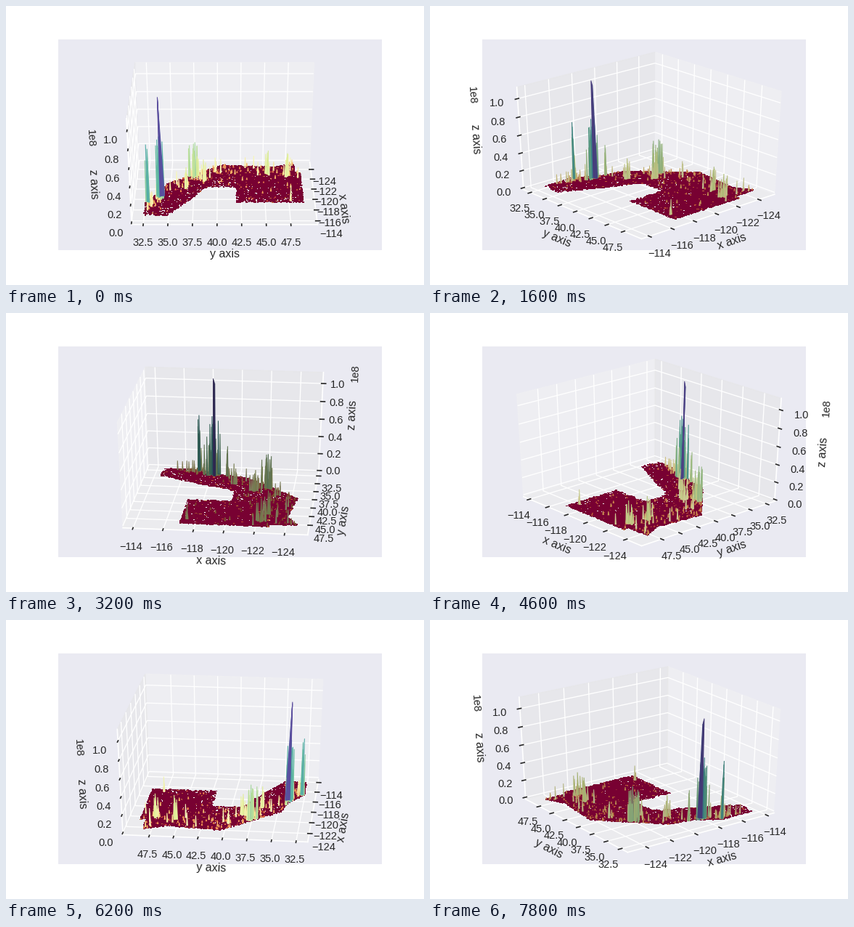
These frames come from a looping animation (576x384 px, 8 s). A matplotlib script:

```python
import numpy as np
import matplotlib.pyplot as plt
from matplotlib.animation import FuncAnimation
from mpl_toolkits.mplot3d.art3d import Poly3DCollection

INK = "0.15"
plt.rcParams.update({
    "font.family": "Liberation Sans",
    "axes.facecolor": "#EAEAF2", "axes.edgecolor": "white",
    "axes.linewidth": 1.25, "axes.labelsize": 12, "axes.labelcolor": INK,
    "text.color": INK, "grid.color": "white", "grid.linewidth": 1,
    "xtick.color": INK, "ytick.color": INK,
    "xtick.labelsize": 11, "ytick.labelsize": 11,
    "xtick.major.width": 1.25, "ytick.major.width": 1.25,
})
FRAMES, INTERVAL, STEP = 40, 200, 6
TOP = 1.1e8
X_LIM, Y_LIM = (-125.27, -113.58), (31.7, 49.83)
rng = np.random.default_rng(7)

# Key points (latitude, longitude) of the coast and the inland border
COAST = [(32.5, -117.1), (34.1, -118.9), (34.6, -120.6), (37.5, -122.5),
         (40.4, -124.4), (46.2, -124), (48.3, -124.7), (48.45, -122.9)]
INLAND = [(32.5, -114.6), (34.9, -114.5), (39, -120), (41.99, -120), (42, -117)]
# Latitude, longitude, relative height and spread of the big clusters
CITIES = [(34.0, -118.1, .62, .3), (32.75, -117.1, .59, .08),
          (34.2, -119.2, .32, .06), (37.6, -122.2, .36, .3),
          (38.5, -121.4, .22, .2), (36.7, -119.8, .22, .1),
          (45.45, -122.65, .25, .12), (47.5, -122.3, .24, .2),
          (47.66, -117.4, .16, .05)]


def coast(lat):
    return np.interp(lat, *np.transpose(COAST))


def inland(lat):
    return np.interp(lat, *np.transpose(INLAND))


def tint(level, shade=1):
    rgba = plt.get_cmap("Spectral")(np.clip(level, 0, 1) ** .35)
    return rgba * np.array([shade, shade, shade, 1])


def ground():
    """Small flat cells, thinning out away from the coast."""
    lat, lon = np.meshgrid(np.arange(32.55, 49, .1), np.arange(-124.75, -114, .1))
    lat, lon = lat.ravel(), lon.ravel()
    west, east = coast(lat), inland(lat)
    depth = (lon - west) / (east - west)
    density = .88 - .3 * depth - .12 * (lat < 42)
    density += .14 * np.sin(3.1 * lat + 1.7 * lon) * np.sin(2.3 * lon - lat)
    keep = (depth > 0) & (depth < 1) & (rng.random(lat.size) < density)
    n = keep.sum()
    x = lon[keep] + rng.uniform(-.03, .03, n)
    y = lat[keep] + rng.uniform(-.03, .03, n)
    w, d = rng.uniform(.035, .068, (2, n))
    z = rng.random(n) * .008 * TOP
    quads = np.stack([np.stack([x + a * d, y + b * w, z], -1)
                      for a, b in ((-1, -1), (1, -1), (1, 1), (-1, 1))], 1)
    level = np.where(rng.random(n) < .03, rng.uniform(.002, .02, n), 0)
    return quads, tint(level, .76)


def peaks():
    """Rows of latitude, longitude, height and lean of the base."""
    rows = [(34.03, -118.2 - .025 * k, 1 - .012 * k, .09 * k) for k in range(5)]
    for lat, lon, top, spread in CITIES:
        rows.append((lat, lon, top, 0))
        for _ in range(int(230 * top * spread) + 4):
            dy, dx = rng.normal(0, spread, 2)
            rows.append((lat + dy, lon + dx, top * rng.uniform(.2, .95) ** 1.3, 0))
    # Lesser towns along the valleys, then scattered low bumps
    for _ in range(90):
        lat = 32.8 + 16 * rng.random() ** 1.6
        lon = coast(lat) + rng.uniform(.3, 2)
        rows.append((lat, lon, .02 + .13 * rng.random() ** 2.5, 0))
    for _ in range(130):
        lat = rng.uniform(32.7, 48.9)
        lon = coast(lat) + (inland(lat) - coast(lat)) * rng.random() ** 1.8
        rows.append((lat, lon, .005 + .04 * rng.random() ** 3, 0))
    lat, lon, level, lean = np.transpose(rows)
    lat = np.clip(lat, 32.55, 48.95)
    lon = np.clip(lon, coast(lat) + .05, inland(lat) - .05)
    return lat, lon, level, lean


def blades(azim):
    """Turn every spike so that its flat side faces the viewer."""
    lat, lon, level, lean = SPIKES
    dx = -np.sin(azim) * np.ptp(X_LIM)
    dy = np.cos(azim) * np.ptp(Y_LIM)
    base, tip = .0052, .0022
    corners = ((-base, 0), (base, 0), (tip, 1), (-tip, 1))
    return np.stack([np.stack([lon + s * dx, lat + s * dy + lean * (1 - up),
                               level * TOP * up], -1)
                     for s, up in corners], 1)


def padded(low, high):
    pad = (high - low) / 48
    return low - pad, high + pad


fig = plt.figure(figsize=(6, 4), dpi=96, facecolor="white")
fig.subplots_adjust(left=.125, right=.9, bottom=.125, top=.88)
ax = fig.add_subplot(projection="3d", computed_zorder=False)
# Let the box stretch over the whole wide axes area
ax.apply_aspect = lambda position=None: None
ax.set_box_aspect((1, 1, 1), zoom=3 ** .5 / 1.8294640721620434)

cells, cell_colors = ground()
ax.add_collection3d(Poly3DCollection(
    cells, facecolors=cell_colors, linewidths=0, antialiased=False, zorder=1))

SPIKES = peaks()
spikes = Poly3DCollection(blades(0), facecolors=tint(SPIKES[2]),
                          linewidths=0, antialiased=True, zorder=2)
ax.add_collection3d(spikes)

ax.set_xticks(np.arange(-124, -113, 2))
ax.set_yticks(np.arange(32.5, 48, 2.5))
ax.set_zticks(np.arange(0, 1.1e8, 2e7))
ax.set_xlim(*padded(*X_LIM))
ax.set_ylim(*padded(*Y_LIM))
ax.set_zlim(*padded(0, TOP))
ax.set_xlabel("x axis")
ax.set_ylabel("y axis")
ax.set_zlabel("z axis")


def update(i):
    # The tiny offset settles which side wall is drawn when seen head-on
    azim = STEP * i + .01
    angle = np.radians(azim)
    ax.view_init(elev=30, azim=azim)
    spikes.set_verts(blades(angle))
    # Sides facing along x are lit, sides facing along y lie in shade
    spikes.set_facecolor(tint(SPIKES[2], .47 + .5 * abs(np.cos(angle)) ** 1.3))
    return []


anim = FuncAnimation(fig, update, frames=FRAMES, interval=INTERVAL,
                     init_func=lambda: update(0), repeat=True, repeat_delay=0)
plt.show()
```
